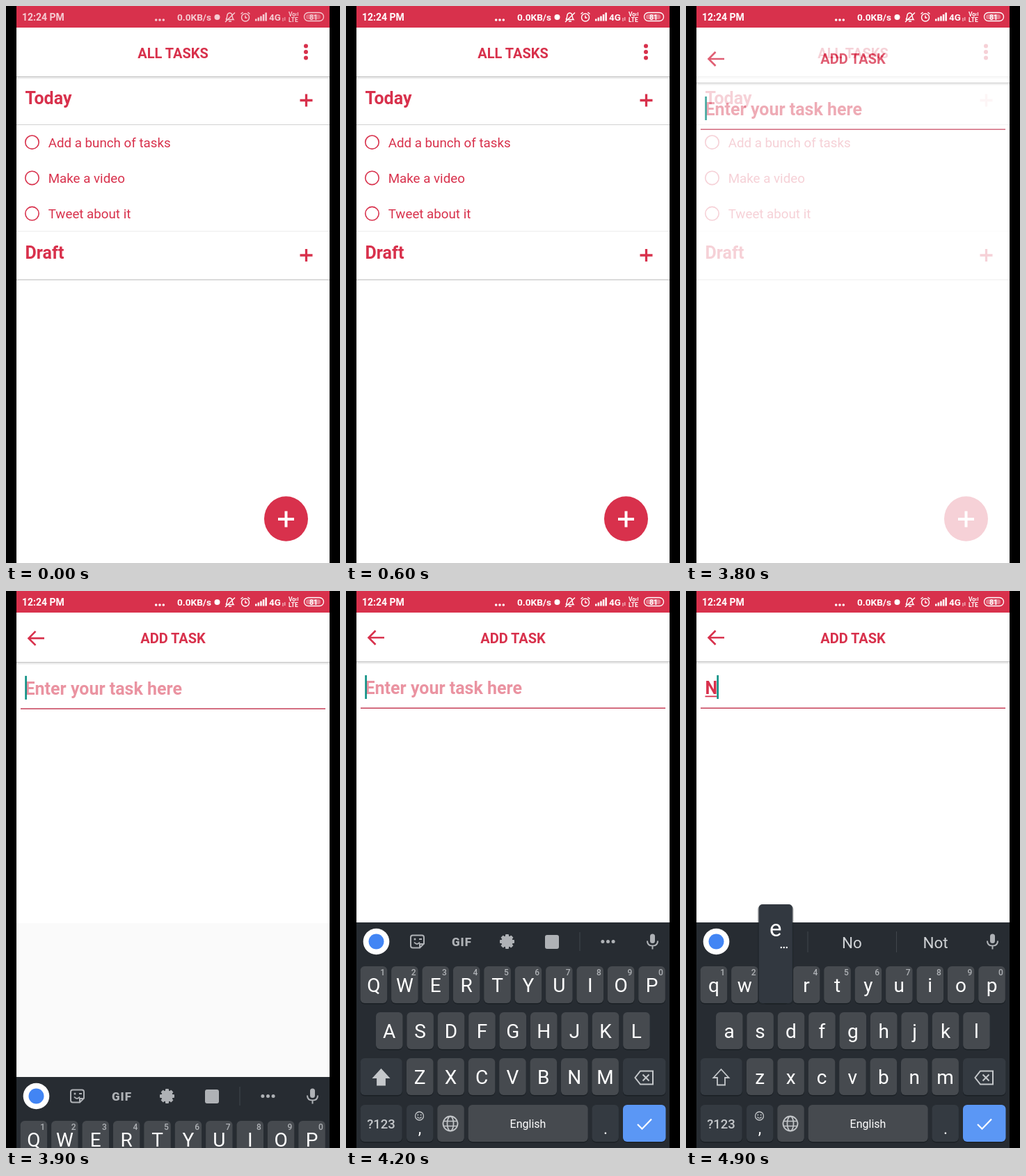
Animation, 480 px wide and 800 px high, one loop 5000 ms. Source, as an HTML page:

```html
<!DOCTYPE html>
<html lang="en">
<head>
<meta charset="utf-8">
<title>Task list</title>
<style>
  html, body { margin: 0; width: 100%; height: 100%; overflow: hidden; background: #000; }
  svg { display: block; width: 100%; height: 100%; font-family: Roboto, sans-serif; }
  text { white-space: pre; }
</style>
</head>
<body>
<svg id="stage" viewBox="0 0 480 800"></svg>
<script>
const RED = '#d8314c', GREY = '#afb2b6', KEY = '#464a4f', DARK_KEY = '#343a41';

const rect = (x, y, w, h, fill, rx = 0, extra = '') =>
  `<rect x="${x}" y="${y}" width="${w}" height="${h}" fill="${fill}" rx="${rx}" ${extra}/>`;
const circle = (x, y, r, fill, extra = '') =>
  `<circle cx="${x}" cy="${y}" r="${r}" fill="${fill}" ${extra}/>`;
const ring = (x, y, r, color, width) =>
  circle(x, y, r, 'none', `stroke="${color}" stroke-width="${width}"`);
const line = (d, color, width, extra = '') =>
  `<path d="${d}" fill="none" stroke="${color}" stroke-width="${width}" ${extra}/>`;
const text = (x, y, size, fill, content, weight = 400, anchor = 'start', extra = '') =>
  `<text x="${x}" y="${y}" font-size="${size}" fill="${fill}" font-weight="${weight}" text-anchor="${anchor}" ${extra}>${content}</text>`;
const group = (id, content) => `<g id="${id}">${content}</g>`;
const plus = (x, y, r, color, width) =>
  line(`M${x - r} ${y}h${2 * r}M${x} ${y - r}v${2 * r}`, color, width);
const dots = (x, y, gap, r, color) =>
  [-1, 0, 1].map(i => circle(x + i * gap, y, r, color)).join('');

function statusBar() {
  const bars = [3, 5, 7, 9.5, 12].map((h, i) => rect(358 + i * 3.6, 21.5 - h, 2.5, h, '#fff')).join('');
  const icons =
    text(23, 21, 14, '#fff', '12:24 PM', 700) +
    dots(221, 20, 5.3, 1.8, '#fff') +
    text(246, 21, 13.6, '#fff', '0.0KB/s', 700) +
    circle(303.5, 16, 4, '#fff') +
    line('M316 19.5h11c-2-2-1.5-4-2-6.5c-1-4-6-4-7 0c-.5 2.500 0 4.500-2 6.500M320 22h4M315 23L329 9.500', '#fff', 1.4) +
    ring(344, 16.5, 5.5, '#fff', 1.4) +
    line('M344 13.500v3.500h2.500M337.500 11.500l3-2.500M350.500 11.500l-3-2.500', '#fff', 1.4) +
    bars +
    text(378, 21, 13.5, '#fff', '4G', 700) +
    line('M398 17v5M400.800 16v5', '#fff', 0.9) +
    text(406, 14.5, 8.5, '#fff', 'Vo', 700) +
    line('M417 10v4M419.500 9v5', '#fff', 1) +
    text(406, 22.5, 8.5, '#fff', 'LTE', 700) +
    rect(428.5, 9.5, 28, 12, 'none', 6, 'stroke="#fff" stroke-width="1.3"') +
    rect(431, 12, 21, 7, '#fff', 3, 'opacity=".35"') +
    text(442, 19.5, 10.5, '#fff', '81', 700, 'middle');
  return rect(15, 0, 450, 31, RED) + group('statusIcons', icons);
}

const header = title =>
  rect(15, 101, 450, 1.5, '#c6c6c6') + rect(15, 102.5, 450, 2, '#ececec') +
  text(240, 74.5, 20, RED, title, 700, 'middle');

function homeScreen() {
  const tasks = ['Add a bunch of tasks', 'Make a video', 'Tweet about it'].map((label, i) => {
    const y = 195.700 + i * 51.2;
    return ring(37.5, y, 9.7, RED, 1.6) + text(60.700, y + 7, 18.75, RED, label);
  }).join('');
  return rect(15, 31, 450, 769, '#fff') + header('ALL TASKS') +
    [57.5, 66, 74.5].map(y => circle(431, y, 3, RED)).join('') +
    text(27.5, 140.5, 25, RED, 'Today', 700) +
    group('todayPlus', plus(431.5, 135.5, 9, RED, 3.3)) +
    rect(15, 170, 450, 1, '#d2d2d2') + tasks +
    rect(15, 323, 450, 1, '#ededed') +
    text(27.5, 363, 25, RED, 'Draft', 700) +
    plus(431.5, 358, 9, RED, 3.3) +
    rect(15, 392.5, 450, 1.5, '#cfcfcf') +
    `<ellipse cx="402.500" cy="736.500" rx="31.500" ry="32.200" fill="${RED}"/>` +
    plus(402.5, 737, 11.5, '#fff', 4);
}

function addScreen() {
  return rect(15, 31, 450, 769, '#fff') + header('ADD TASK') +
    line('M55 67H33M42.500 57L32.500 67L42.500 77', RED, 2.6) +
    group('hint', text(27.5, 148, 25, RED, 'Enter your task here', 700, 'start', 'opacity=".52"')) +
    group('typed', text(27.5, 148, 25, RED, 'N', 700) + rect(27.5, 150.5, 17, 1.8, RED)) +
    rect(0, 121, 2.6, 34, '#0b8f83', 0, 'id="cursor"') +
    rect(21, 167.5, 438, 1.5, '#c63f58') +
    rect(15, 476, 450, 324, '#fafafa', 0, 'id="backdrop"');
}

const key = (x, y, w, fill = KEY) => rect(x, y + 1.5, w, 53, '#1b2025', 6) + rect(x, y, w, 53, fill, 6);

function letterRow(letters, left, top, hints) {
  return [...letters].map((letter, i) => {
    const x = left + i * 44.4;
    return key(x, top, 38.5) +
      text(x + 19.2, top + 36.5, 28, '#fff', letter, 400, 'middle', 'class="letter"') +
      (hints ? text(x + 32, top + 13, 12, GREY, (i + 1) % 10, 500, 'middle') : '');
  }).join('');
}

function toolbar() {
  const teeth = [0, 45, 90, 135].map(a =>
    rect(229, 493, 5, 21, GREY, 1, `transform="rotate(${a} 231.5 503.5)"`)).join('');
  return line('M96 494.500h13q3 0 3 3v9l-6 6h-10q-3 0-3-3v-12q0-3 3-3zM106 512v-5h6', GREY, 2) +
    circle(99, 500, 1.5, GREY) + line('M105 500h4M98 504.500q4 5 8 0', GREY, 1.8) +
    text(166.5, 509.5, 17, GREY, 'GIF', 900, 'middle', 'letter-spacing="1"') +
    teeth + ring(231.5, 503.5, 5.8, GREY, 5) +
    rect(286, 494, 20, 20, GREY, 3) +
    rect(335.5, 490, 1, 27, '#41464c') +
    dots(376.5, 503.5, 7.6, 2.5, GREY);
}

function suggestions() {
  const words = [['N', 118.5], ['No', 238.5], ['Not', 358.5]];
  return words.map(([word, x]) => text(x, 512.5, 22.5, '#cfd2d5', word, 400, 'middle')).join('') +
    [174.5, 302].map(x => rect(x, 489, 1, 30, '#41464c')).join('');
}

const popup = (id, x, y, letter) => group(id,
  rect(x - 1.5, y + 1, 51, 143, '#1d2227', 6, 'opacity=".5"') +
  rect(x, y, 48, 142, '#323840', 5) +
  text(x + 24, y + 45.5, 33, '#fff', letter, 400, 'middle') +
  dots(x + 36, y + 62, 4, 1.2, '#fff'));

function keyboard() {
  const mic = rect(437, 492.5, 7, 13.5, GREY, 3.5) +
    line('M433 502.500q0 7 7.500 7t7.500-7M440.500 509v5.500', GREY, 2);
  const backspace = line('M423 689.500h18v19h-18l-7.500-9.500zM426.500 694.500l9 9M435.500 694.500l-9 9', '#c4c7ca', 2);
  const globe = ring(150, 765, 10.5, '#c4c7ca', 1.8) +
    `<ellipse cx="150" cy="765" rx="4.500" ry="10.500" fill="none" stroke="#c4c7ca" stroke-width="1.700"/>` +
    line('M140.500 761.500h19M140.500 768.500h19', '#c4c7ca', 1.7);
  const smiley = ring(105.5, 754, 6, '#c4c7ca', 1.3) +
    circle(103.3, 752.5, 0.9, '#c4c7ca') + circle(107.7, 752.5, 0.9, '#c4c7ca') +
    line('M102.500 755.500q3 3.500 6 0', '#c4c7ca', 1.2);
  return rect(15, 476, 450, 330, '#272c32') +
    circle(43.5, 503.5, 18.8, '#fff') + circle(43.5, 503.5, 11, '#4285f4') +
    group('toolbar', toolbar()) + group('suggestions', suggestions()) + mic +
    letterRow('qwertyuiop', 20.7, 539, true) +
    letterRow('asdfghjkl', 43, 605) +
    key(20.7, 671, 60, DARK_KEY) + letterRow('zxcvbnm', 87, 671) + key(398, 671, 61.5, DARK_KEY) +
    `<path id="shift" d="M50.500 687L61.500 699H56V709.500H45V699H39.500Z" stroke="#c4c7ca" stroke-width="1.800"/>` +
    backspace +
    key(20.7, 738, 60, DARK_KEY) + text(50.5, 772, 18.5, '#c4c7ca', '?123', 500, 'middle') +
    key(87, 738, 38.5, DARK_KEY) + smiley + text(106, 780, 23, '#fff', ',', 400, 'middle') +
    key(131.300, 738, 38.5) + globe +
    key(175.700, 738, 172) + text(261.5, 771, 16, '#fff', 'English', 400, 'middle') +
    key(353.400, 738, 38.5, DARK_KEY) + text(373, 780, 23, '#fff', '.', 400, 'middle') +
    key(398, 738, 61.5, '#5b97f5') + line('M419 766l6.500 6.500l13.500-14', '#fff', 2.2) +
    popup('popupN', 304.3, 583, 'N') + popup('popupE', 104.800, 450, 'e');
}

const byId = id => document.getElementById(id);
byId('stage').innerHTML =
  group('home', homeScreen()) + group('add', addScreen()) + group('keyboard', keyboard()) + statusBar();
const letters = [...document.querySelectorAll('.letter')];

const show = (id, visible) => byId(id).setAttribute('display', visible ? 'inline' : 'none');
const move = (id, y) => byId(id).setAttribute('transform', `translate(0 ${y})`);
const fade = (id, opacity) => byId(id).setAttribute('opacity', opacity);

function render(t) {
  fade('statusIcons', 0.75 + 0.25 * Math.min(1, t / 600));
  fade('todayPlus', t >= 3500 ? 0.2 : 1);

  // The new screen rises and fades in with a quintic ease-out.
  const progress = 1 - (1 - Math.min(1, Math.max(0, (t - 3670) / 400))) ** 5;
  show('add', t >= 3700);
  fade('add', Math.min(1, 1.05 * progress ** 2));
  move('add', 64 * (1 - progress));
  show('backdrop', t >= 3900);

  show('keyboard', t >= 3900);
  move('keyboard', t < 4000 ? 222 : t < 4100 ? 3 : 0);

  const typing = t >= 4500;
  show('hint', !typing);
  show('typed', typing);
  show('cursor', t < 4300 || typing);
  byId('cursor').setAttribute('x', typing ? 44.3 : 27.3);
  byId('shift').setAttribute('fill', typing ? 'none' : '#c4c7ca');
  for (const el of letters) {
    el.textContent = typing ? el.textContent.toLowerCase() : el.textContent.toUpperCase();
  }
  show('toolbar', t < 4600);
  show('suggestions', t >= 4600);
  show('popupN', t >= 4500 && t < 4600);
  show('popupE', t >= 4900);
}

const start = performance.now();
function tick() {
  const elapsed = (performance.now() - start) % 5000;
  render(Math.floor(elapsed / 100) * 100);
  requestAnimationFrame(tick);
}
tick();
</script>
</body>
</html>
```
